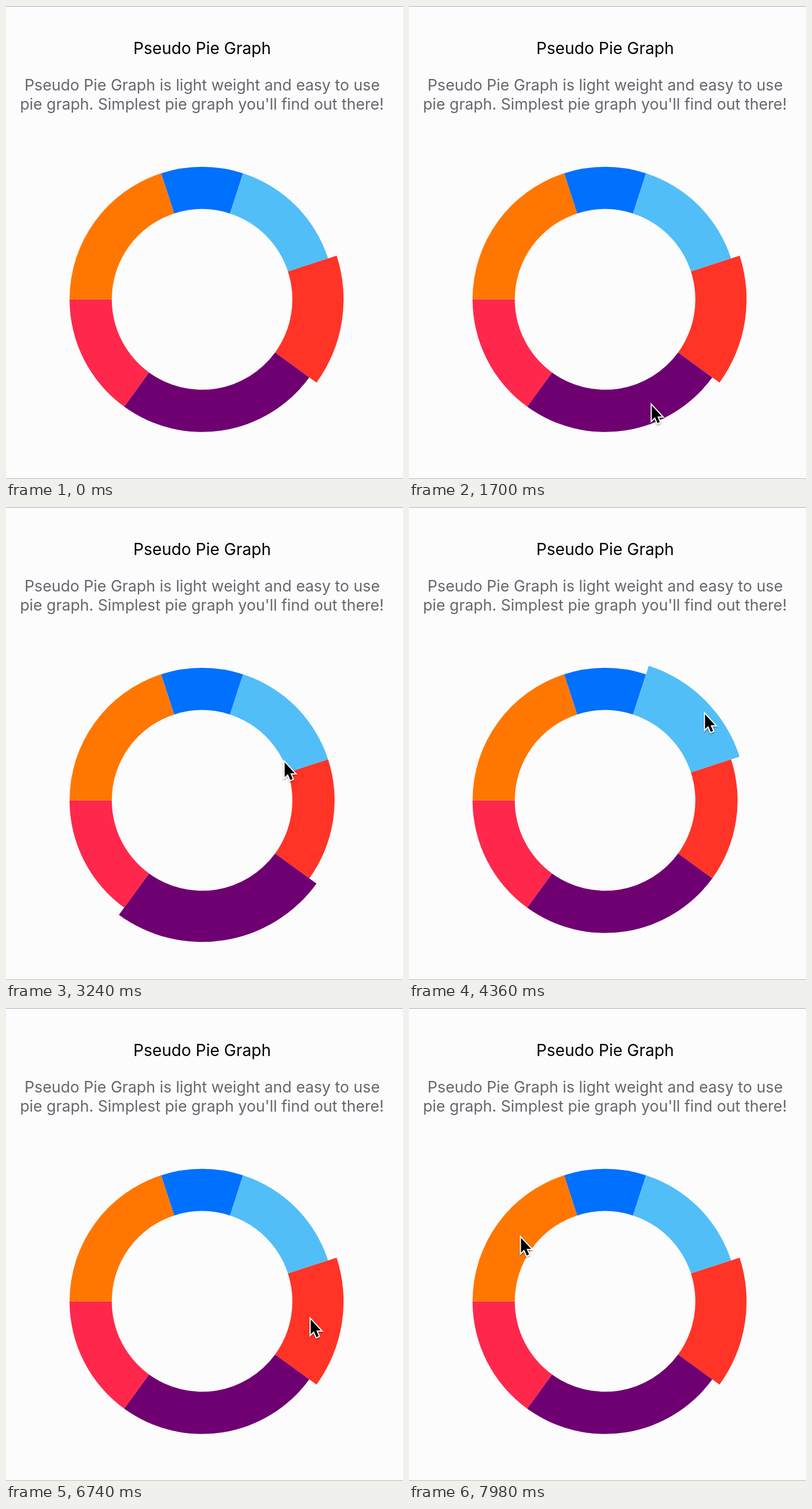
These frames come from a looping animation (686x817 px, 8000 ms). An HTML page:

```html
<!DOCTYPE html>
<html lang="en">
<head>
<meta charset="utf-8">
<title>Pseudo Pie Graph</title>
<style>
  html, body { margin: 0; width: 100%; height: 100%; overflow: hidden; background: #fcfcfc; }
  svg { display: block; width: 100%; height: 100%; }
  text { font-family: Inter, "Open Sans", sans-serif; text-anchor: middle; }
  .title { font-size: 28.1px; fill: #000; }
  .body { font-size: 26.7px; fill: #66666e; }
  #cursor { filter: drop-shadow(0 2px 1.5px rgba(0, 0, 0, .3)); }
</style>
</head>
<body>
<svg viewBox="0 0 686 817">
  <rect width="686" height="817" fill="#fcfcfc"/>
  <rect width="686" height="1" fill="#a9a9b6"/>
  <rect y="816" width="686" height="1" fill="#b9b9b0"/>
  <text class="title" x="339" y="82.5">Pseudo Pie Graph</text>
  <text class="body" x="339" y="145.5">Pseudo Pie Graph is light weight and easy to use</text>
  <text class="body" x="338.5" y="178.5">pie graph. Simplest pie graph you'll find out there!</text>
  <g id="ring" transform="translate(338.8 506.8)"></g>
  <path id="cursor" d="M1.5 3V28.5L7 23.3L11.4 33.5L15.4 31.8L11.2 22H19Z"
        fill="#000" stroke="#fff" stroke-width="4" paint-order="stroke"/>
</svg>
<script>
const LOOP = 8000;
const INNER = 156, OUTER = 229, RAISED = 244.5;
const MOVE = 400;         // duration of every pointer move
const CLICK_LEAD = 200;   // a click comes this long before the pointer leaves

const slices = [
  { name: 'blue', percent: 10, color: '#0070ff' },
  { name: 'sky', percent: 15, color: '#52bef7' },
  { name: 'red', percent: 15, color: '#ff3426' },
  { name: 'purple', percent: 25, color: '#6f0072' },
  { name: 'pink', percent: 15, color: '#ff284c' },
  { name: 'orange', percent: 20, color: '#ff7700' }
];

const below = { x: 430, y: 830 };
const visits = [
  { arrive: 0, ...below, click: 'red' },
  { arrive: 820, x: 418, y: 687, click: 'purple' },
  { arrive: 2400, ...below },
  { arrive: 3220, x: 480, y: 438 },
  { arrive: 3660, x: 510, y: 355, click: 'sky' },
  { arrive: 4880, x: 535, y: 716 },
  { arrive: 5300, x: 520, y: 471, click: 'red' },
  { arrive: 6200, x: 530, y: 685 },
  { arrive: 6700, x: 525, y: 535 },
  { arrive: 7700, x: 192, y: 394 }
];

const smooth = u => u * u * (3 - 2 * u);
const mix = (a, b, u) => a + (b - a) * u;

function polar(radius, turn) {
  const angle = turn * 2 * Math.PI;
  return `${radius * Math.cos(angle)} ${radius * Math.sin(angle)}`;
}

function slicePath({ start, end }, outer) {
  return `M${polar(INNER, start)}L${polar(outer, start)}` +
    `A${outer} ${outer} 0 0 1 ${polar(outer, end)}L${polar(INNER, end)}` +
    `A${INNER} ${INNER} 0 0 0 ${polar(INNER, start)}Z`;
}

function pointerAt(time) {
  const index = visits.findLastIndex(visit => visit.arrive <= time);
  const from = visits[index], to = visits[index + 1] ?? from;
  const u = smooth(Math.min(1, Math.max(0, 1 - (to.arrive - time) / MOVE)));
  return [mix(from.x, to.x, u), mix(from.y, to.y, u)];
}

function selectedAt(time) {
  const clicked = visits.findLast((visit, i) => visit.click &&
    (i === 0 || time >= visits[i + 1].arrive - MOVE - CLICK_LEAD));
  return clicked.click;
}

const ring = document.getElementById('ring');
const cursor = document.getElementById('cursor');
let turn = -0.3;
for (const slice of slices) {
  slice.start = turn;
  slice.end = turn += slice.percent / 100;
  slice.node = document.createElementNS('http://www.w3.org/2000/svg', 'path');
  slice.node.setAttribute('fill', slice.color);
  ring.append(slice.node);
}

function draw() {
  const time = performance.now() % LOOP;
  const selected = selectedAt(time);
  for (const slice of slices) {
    slice.node.setAttribute('d', slicePath(slice, slice.name === selected ? RAISED : OUTER));
  }
  cursor.setAttribute('transform', `translate(${pointerAt(time)})`);
  requestAnimationFrame(draw);
}
draw();
</script>
</body>
</html>
```
